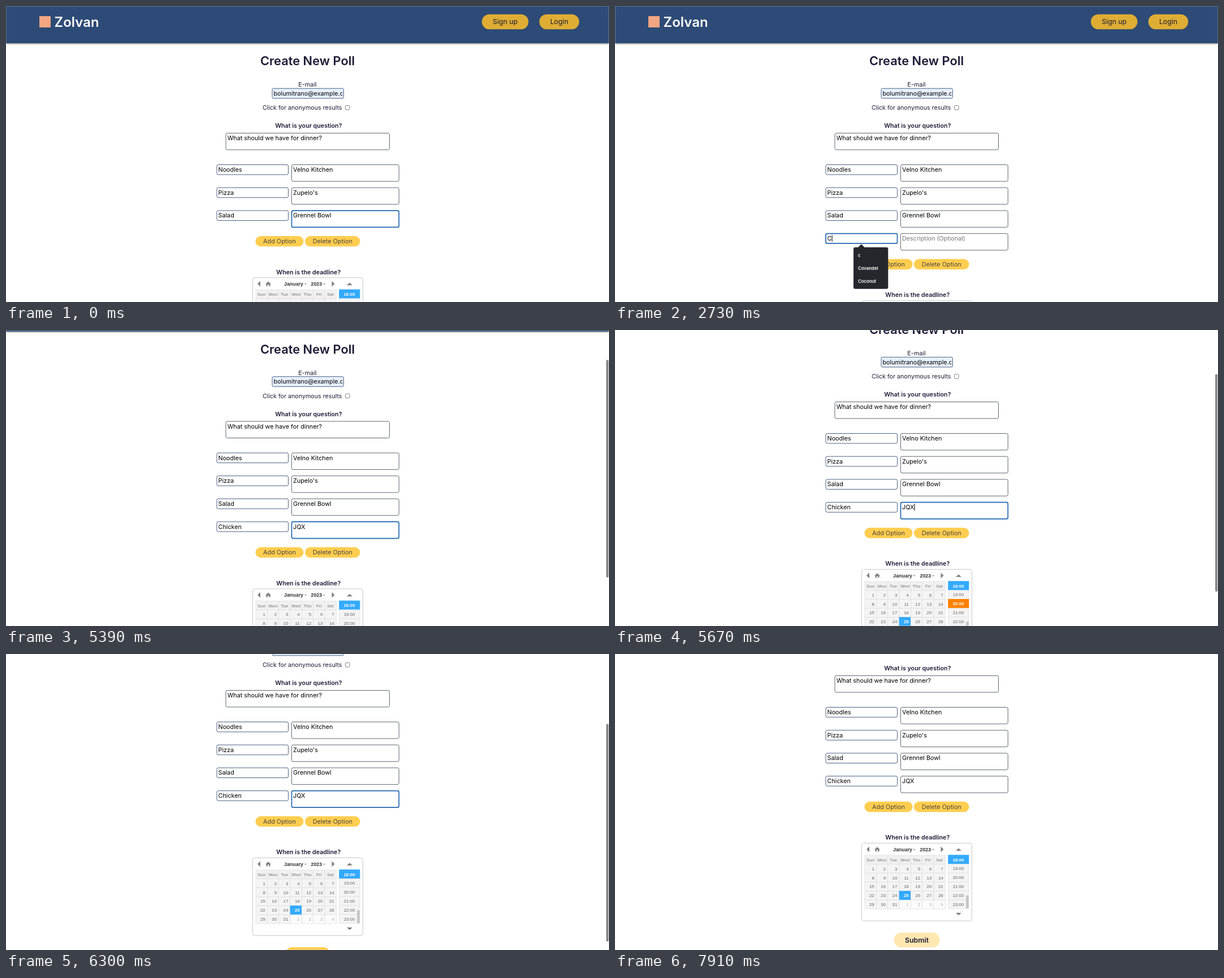
An HTML page for the animation above (8 s loop, 1067 by 525 pixels).

```html
<!DOCTYPE html>
<html lang="en">
<head>
<meta charset="utf-8">
<title>Create New Poll</title>
<style>
  html, body { margin: 0; width: 100%; height: 100%; overflow: hidden; background: #fff; }
  svg { display: block; width: 100%; height: 100%; }
  text { font-family: Inter, "Open Sans", sans-serif; font-optical-sizing: none; white-space: pre; }
  .cal text { font-family: "Liberation Sans", Arial, sans-serif; }
  .bar { filter: drop-shadow(0 1px 1.5px rgba(0, 0, 0, .55)); }
</style>
</head>
<body>
<svg id="stage" viewBox="0 0 1067 525"></svg>
<script>
const NS = 'http://www.w3.org/2000/svg';
const LOOP = 8000, FRAME = 70, PITCH = 40.7, ROW_TOP = 281.3;
const INK = '#1d1a35', YELLOW = '#ffcd4f', PALE = '#ffe7b0', BLUE = '#33aaff', ORANGE = '#ff8000';
const INPUT_EDGE = '#4a6283', AREA_EDGE = '#626771', FOCUS = '#2067b2', GRID = '#ddd';

const OPTIONS = [['Noodles', 'Velno Kitchen'], ['Pizza', "Zupelo's"], ['Salad', 'Grennel Bowl'], ['', '']];
const DAYS = ['Sun', 'Mon', 'Tue', 'Wed', 'Thu', 'Fri', 'Sat'];

// [start in ms, value] steps
const NAME_TYPING = [[0, ''], [2730, 'C'], [2800, 'Ch'], [3010, 'Chi'], [3080, 'Chic'],
  [3150, 'Chick'], [3290, 'Chicke'], [3430, 'Chicken']];
const DESC_TYPING = [[0, ''], [4200, 'J'], [4410, 'JQ'], [4620, 'JQX']];
const FOCUSED = [[0, 'desc2'], [700, ''], [1820, 'name3'], [3640, 'desc3'], [7630, '']];
const CARET = [[0, 0], [70, 1], [630, 0], [1820, 1], [2310, 0], [2730, 1], [4130, 0], [4200, 1],
  [5180, 0], [5600, 1], [6090, 0], [6720, 1], [7140, 0]];
const BAR_ALPHA = [[0, 0], [5180, 1], [7770, .66], [7840, .33], [7910, 0]];
// each flick: start, then the scroll offset per frame
const FLICKS = [
  [5180, [8, 26, 46, 63.5, 76, 85, 92, 98, 102, 105, 106.5, 107]],
  [6090, [113, 131, 149, 161, 163, 163.5, 164, 164]],
  [7000, [168, 175, 181, 185, 187]]
];

const at = (steps, t) => steps.reduce((v, [start, val]) => t >= start ? val : v, steps[0][1]);

function scrollAt(t) {
  let y = 0;
  for (const [start, path] of FLICKS)
    if (t >= start) y = path[Math.min(path.length - 1, Math.floor((t - start) / FRAME))];
  return y;
}

function add(parent, tag, attrs = {}) {
  const el = document.createElementNS(NS, tag);
  set(el, attrs);
  return parent.appendChild(el);
}
function set(el, attrs) {
  for (const k in attrs) el.setAttribute(k, attrs[k]);
}
const rect = (p, x, y, width, height, attrs) => add(p, 'rect', { x, y, width, height, ...attrs });
const path = (p, d, fill = '#808080') => add(p, 'path', { d, fill });

// cy is the middle of the capitals
function label(p, str, x, cy, size = 10.7, attrs = {}) {
  const el = add(p, 'text', { x, y: cy + size * .36, 'font-size': size, fill: INK, ...attrs });
  el.textContent = str;
  return el;
}
const entry = (p, str, x, cy, attrs) => label(p, str, x, cy, 10.8, { fill: '#000', ...attrs });
const MID = { 'text-anchor': 'middle' };
const MIDBOLD = { ...MID, 'font-weight': 600 };

function pill(p, str, x, y, w, h, size, fill, attrs = {}) {
  const box = rect(p, x, y, w, h, { rx: h / 2, fill });
  label(p, str, x + w / 2, y + h / 2, size, { ...MID, ...attrs });
  return box;
}
const field = (p, x, y, w, h, stroke, fill = '#fff') =>
  rect(p, x + .5, y + .5, w - 1, h - 1, { rx: 2.5, fill, stroke, 'stroke-width': 1 });

const stage = document.getElementById('stage');
rect(stage, 0, 0, 1067, 525, { fill: '#fff' });
const page = add(stage, 'g');

// top bar
rect(page, 0, 0, 1067, 66, { fill: '#2d4b76', class: 'bar' });
rect(page, 59, 18, 20, 20, { fill: '#f3a683' });
label(page, 'Zolvan', 85.5, 28.5, 24, { fill: '#fff', 'font-weight': 600 });
pill(page, 'Sign up', 842, 14.7, 82.5, 26.6, 12.3, '#dfad33');
pill(page, 'Login', 943.7, 14.7, 70.5, 26.6, 12.3, '#dfad33');

// poll form
label(page, 'Create New Poll', 533.5, 97.5, 21.8, MIDBOLD);
label(page, 'E-mail', 533.5, 139.5, 10.9, MID);
field(page, 470.5, 145.7, 127.5, 18.6, INPUT_EDGE, '#e8f0fe');
const clip = add(add(stage, 'defs'), 'clipPath', { id: 'mail' });
rect(clip, 473, 146, 122.5, 18);
entry(page, 'bolumitrano@example.com', 473.5, 154.7, { 'clip-path': 'url(#mail)' });
label(page, 'Click for anonymous results', 454, 180.3);
rect(page, 600.5, 176.5, 7.6, 7.6, { rx: 1.6, fill: '#fff', stroke: '#767676', 'stroke-width': .9 });
label(page, 'What is your question?', 535.3, 212.5, 10.7, MIDBOLD);
field(page, 388.5, 225, 290.5, 30.5, AREA_EDGE);
entry(page, 'What should we have for dinner?', 391.7, 234.3);

const boxes = {}, texts = {};
const rows = OPTIONS.map(([name, desc], i) => {
  const g = add(page, 'g'), y = ROW_TOP + i * PITCH - .3;
  boxes['name' + i] = field(g, 372.5, y, 127.5, 18.6, INPUT_EDGE);
  boxes['desc' + i] = field(g, 505, y, 190.8, 30.5, AREA_EDGE);
  texts['name' + i] = entry(g, name, 375.5, y + 9.2);
  texts['desc' + i] = entry(g, desc, 508, y + 9.2);
  return g;
});
const hint = entry(rows[3], 'Description (Optional)', 508, ROW_TOP + 3 * PITCH + 8.9, { fill: '#757575' });
const caret = rect(page, 0, 0, 1, 12, { fill: '#000' });

// everything below the options, placed for four rows
const below = add(page, 'g');
const addBtn = pill(below, 'Add Option', 441.5, 448.7, 85, 18.6, 10.9, YELLOW, { fill: '#4b4540' });
pill(below, 'Delete Option', 529, 448.7, 97.5, 18.6, 10.9, YELLOW, { fill: '#4b4540' });
label(below, 'When is the deadline?', 535.3, 512.5, 10.7, MIDBOLD);
const submit = pill(below, 'Submit', 493.5, 681, 81, 26.5, 12.4, YELLOW, { 'font-weight': 600 });

// date picker
const cal = add(below, 'g', { class: 'cal', transform: 'translate(0 187)' });
const COL = 20.33, LINE = 15.85;
const tile = (x, y, w, fill, stroke = GRID) =>
  rect(cal, x, y, w, LINE, { fill, stroke, 'stroke-width': .7 });
rect(cal, 436.5, 335.5, 195, 138, { rx: 4, fill: '#fff', stroke: '#c8c8c8' });
path(cal, 'M450 341.5v10l-5-5z');
path(cal, 'M576.5 341.5v10l5-5z');
path(cal, 'M459 347l5-4.7 5 4.7h-1.5v3.6h-2.4v-3h-2.2v3h-2.4v-3.6z');
path(cal, 'M603 349l5-4.5 5 4.5z');
path(cal, 'M603 459l5 4.5 5-4.5z');
path(cal, 'M528 346h4l-2 2z');
path(cal, 'M561 346h4l-2 2z');
label(cal, 'January', 492, 346.5, 8.9, { fill: '#333', 'font-weight': 700 });
label(cal, '2023', 539.5, 346.5, 8.8, { fill: '#333', 'font-weight': 700 });

DAYS.forEach((day, i) => {
  const x = 442 + i * COL;
  tile(x, 357, COL, '#f1f1f1');
  label(cal, day, x + COL / 2, 365.3, 7.6, { ...MID, fill: '#999', 'font-weight': 700 });
});

let nextMonthCell, nextMonthText;
for (let i = 0; i < 35; i++) {
  const x = 442 + i % 7 * COL, y = 372.9 + Math.floor(i / 7) * LINE;
  const today = i === 24, other = i > 30;
  const cell = tile(x, y, COL, today ? BLUE : other ? '#fbfbfb' : '#f4f4f4', today ? BLUE : GRID);
  const num = label(cal, i % 31 + 1, x + COL - 3.5, y + 8, 8, {
    'text-anchor': 'end', fill: today ? '#fff' : other ? '#b0b0b0' : '#666',
    'font-weight': today ? 700 : 400
  });
  if (i === 31) [nextMonthCell, nextMonthText] = [cell, num];
}

let hourCell, hourText;
for (let i = 0; i < 6; i++) {
  const y = 356.7 + i * LINE;
  const cell = tile(589.7, y, 36.3, i ? '#f4f4f4' : BLUE, i ? GRID : BLUE);
  const txt = label(cal, 18 + i + ':00', 607.5, y + 8, 7.9, {
    ...MID, fill: i ? '#666' : '#fff', 'font-weight': i ? 400 : 700
  });
  if (i === 2) [hourCell, hourText] = [cell, txt];
}
rect(cal, 621.3, 428.3, 4.5, 23, { fill: '#c4c4c4' });

// autocomplete list
const popup = add(page, 'g');
path(popup, 'M429.5 428.5l6.3-6 6.3 6z', '#24282c');
rect(popup, 422, 428, 61.3, 73.7, { rx: 3, fill: '#24282c' });
['c', 'Covandel', 'Coconut'].forEach((word, i) =>
  label(popup, word, 430, 442 + i * 23, 7.8, { fill: '#fff', 'font-weight': 600 }));

const thumb = rect(stage, 1062, 0, 4.3, 386, { rx: 2.1, fill: '#898989' });
// light window edge, visible over the top bar
rect(stage, 0, 0, 1067, 525, { fill: 'none', stroke: '#fff', 'stroke-opacity': .35, 'stroke-width': 1.4 });

const show = (el, on) => set(el, { visibility: on ? 'visible' : 'hidden' });
function hover(cell, txt, on, fill, ink) {
  set(cell, { fill: on ? ORANGE : fill, stroke: on ? ORANGE : GRID });
  set(txt, { fill: on ? '#fff' : ink, 'font-weight': on ? 700 : 400 });
}

function draw(t) {
  const y = scrollAt(t), four = t >= 1400, focus = at(FOCUSED, t);
  set(page, { transform: `translate(0 ${-y})` });
  set(below, { transform: `translate(0 ${four ? 0 : -PITCH})` });

  show(rows[3], four);
  for (const id in boxes) {
    const on = id === focus;
    set(boxes[id], {
      stroke: on ? FOCUS : id.startsWith('name') ? INPUT_EDGE : AREA_EDGE,
      'stroke-width': on ? 1.7 : 1
    });
  }
  texts.name3.textContent = at(NAME_TYPING, t);
  texts.desc3.textContent = at(DESC_TYPING, t);
  show(hint, four && t < 4200);

  show(caret, focus && at(CARET, t));
  if (focus) {
    const txt = texts[focus], width = txt.textContent ? txt.getComputedTextLength() : 0;
    set(caret, { x: +txt.getAttribute('x') + width + .2, y: ROW_TOP + focus.slice(-1) * PITCH + 2.8 });
  }

  show(popup, t >= 2730 && t < 2800);
  set(addBtn, { fill: t >= 630 && t < 1400 ? PALE : YELLOW });
  set(submit, { fill: t >= 7490 ? PALE : YELLOW });
  hover(hourCell, hourText, t >= 5600 && t < 6160, '#f4f4f4', '#666');
  hover(nextMonthCell, nextMonthText, t >= 6720 && t < 7070, '#fbfbfb', '#b0b0b0');

  const top = 6.8 + .728 * y;
  set(thumb, { y: top, height: Math.min(386, 523 - top), opacity: at(BAR_ALPHA, t) });
}

const begin = performance.now();
function tick() {
  draw((performance.now() - begin) % LOOP);
  requestAnimationFrame(tick);
}
tick();
</script>
</body>
</html>
```
